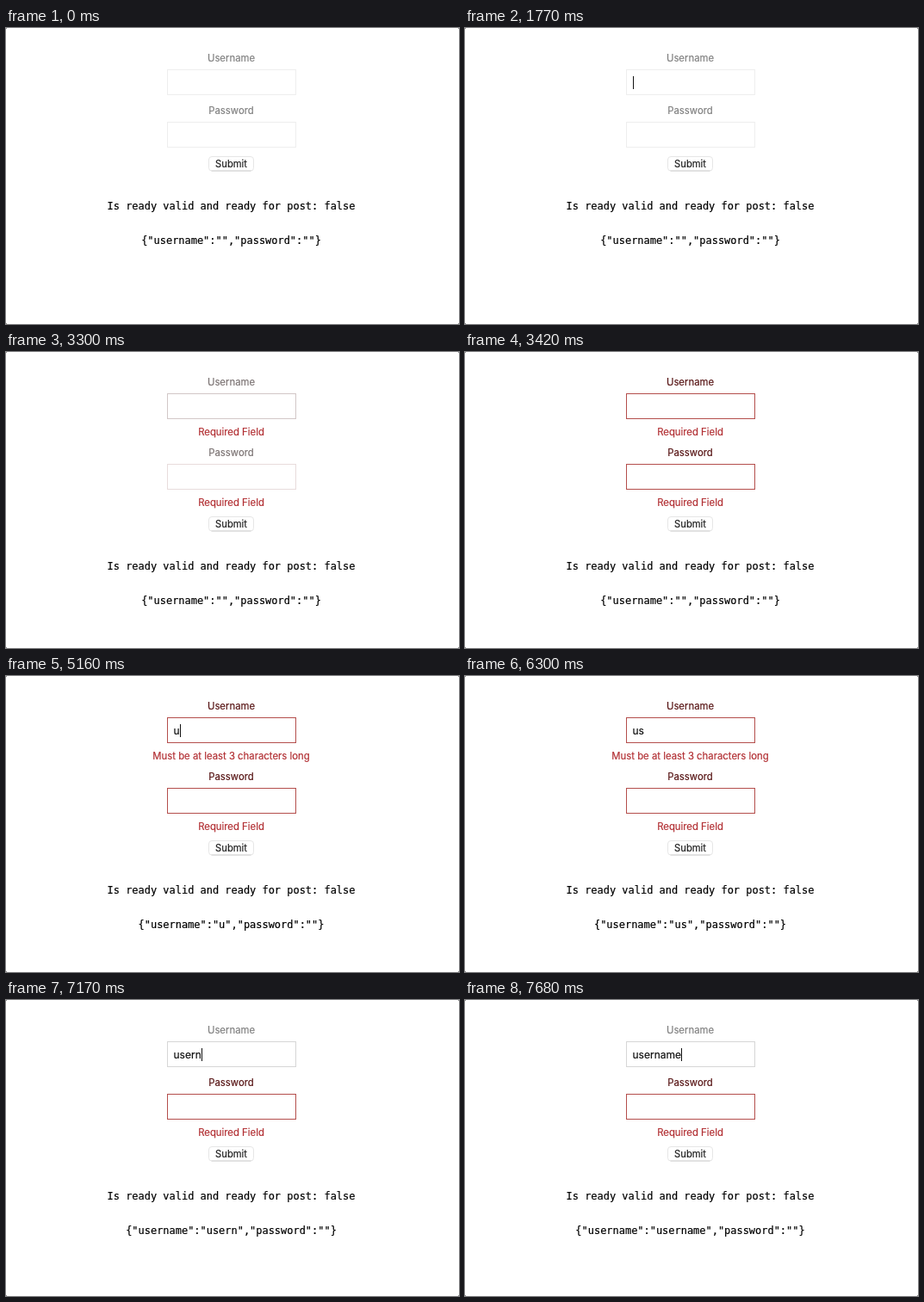
An HTML page with a canvas for the animation above (8 s loop, 526x344 px).

```html
<!DOCTYPE html>
<html lang="en">
<head>
<meta charset="utf-8">
<title>Form validation</title>
<style>
  html, body { margin: 0; width: 100%; height: 100%; overflow: hidden; background: #fff; }
  canvas { display: block; width: 526px; height: 344px; }
</style>
</head>
<body>
<canvas id="stage"></canvas>
<script>
const W = 526, H = 344, LOOP = 8000, MID = 261.5;
const SANS = 'Inter, sans-serif';
const LABEL = `11.35px ${SANS}`, INPUT = `12px ${SANS}`, BUTTON = `11.2px ${SANS}`;
const MONO = '11.96px "DejaVu Sans Mono", monospace';
const FOCUS = 1770, SUBMIT = 3270, VALID = 6330, FADE = 150;
const ERROR_ROW = 21;

const GREY_LABEL = [128, 128, 128], RED_LABEL = [88, 22, 22];
const IDLE = [238, 238, 238], ACTIVE = [214, 214, 214], RED_LINE = [180, 78, 76];
const RED_TEXT = 'rgb(178,48,52)';

// Moments at which the username gains one more letter.
const KEYS = [5160, 5790, 6330, 6840, 7170, 7350, 7500, 7680];
// Spans in which the caret is lit.
const CARET = [[1770, 2220], [2670, 3120], [4740, 5610], [5790, 6210], [6330, 6780], [6840, 8000]];

const canvas = document.getElementById('stage');
const ctx = canvas.getContext('2d');
const dpr = window.devicePixelRatio || 1;
canvas.width = Math.round(W * dpr);
canvas.height = Math.round(H * dpr);

const clamp = x => Math.max(0, Math.min(1, x));
const fade = (t, start) => {
  const x = clamp((t - start) / FADE);
  return x * x * (3 - 2 * x);
};
const mix = (a, b, k) => a.map((v, i) => v + (b[i] - v) * k);
const rgb = c => `rgb(${c.map(Math.round).join(',')})`;

// A hairline outline gives the letters a slightly fuller weight.
function text(str, x, y, font, color, align = 'center') {
  ctx.font = font;
  ctx.fillStyle = ctx.strokeStyle = color;
  ctx.textAlign = align;
  ctx.lineWidth = 0.2;
  ctx.fillText(str, x, y);
  ctx.strokeText(str, x, y);
}

function field(label, labelY, labelColor, lineColor, error) {
  const top = labelY + 9;
  text(label, MID, labelY, LABEL, rgb(labelColor));
  ctx.strokeStyle = rgb(lineColor);
  ctx.lineWidth = 1;
  ctx.strokeRect(187.5, top + 0.5, 149, 29);
  if (error) text(error, MID, top + 49, LABEL, RED_TEXT);
}

function button(y) {
  ctx.beginPath();
  ctx.roundRect(235.5, y + 0.5, 52, 16.5, 3.5);
  ctx.strokeStyle = '#e6e6e6';
  ctx.lineWidth = 1;
  ctx.stroke();
  ctx.fillStyle = '#d2d2d2';
  ctx.fillRect(238.5, y + 16.5, 46, 1);
  text('Submit', MID, y + 13, BUTTON, '#222');
}

function corners() {
  ctx.fillStyle = '#8c8c8c';
  for (const x of [0, W - 1]) for (const y of [0, H - 1]) ctx.fillRect(x, y, 1, 1);
}

function draw(t) {
  ctx.setTransform(dpr, 0, 0, dpr, 0, 0);
  ctx.fillStyle = '#fff';
  ctx.fillRect(0, 0, W, H);
  corners();

  const name = 'username'.slice(0, KEYS.filter(k => t >= k).length);
  const submitted = t >= SUBMIT;
  const nameBad = submitted && t < VALID;
  const red = fade(t, SUBMIT);
  const nameRed = red * (1 - fade(t, VALID));
  const nameLine = mix(mix(IDLE, ACTIVE, fade(t, FOCUS)), RED_LINE, nameRed);
  const nameError = nameBad && (name ? 'Must be at least 3 characters long' : 'Required Field');

  field('Username', 39, mix(GREY_LABEL, RED_LABEL, nameRed), nameLine, nameError);
  text(name, 194.5, 68, INPUT, '#111', 'left');
  if (CARET.some(([on, off]) => t >= on && t < off)) {
    const x = Math.round(194.5 + ctx.measureText(name).width);
    ctx.fillStyle = '#111';
    ctx.fillRect(x, 56, 1, 15);
  }

  let shift = nameBad ? ERROR_ROW : 0;
  field('Password', 100 + shift, mix(GREY_LABEL, RED_LABEL, red), mix(IDLE, RED_LINE, red),
    submitted && 'Required Field');

  if (submitted) shift += ERROR_ROW;
  button(149 + shift);
  text('Is ready valid and ready for post: false', MID, 211 + shift, MONO, '#000');
  text(JSON.stringify({ username: name, password: '' }), MID, 251 + shift, MONO, '#000');
}

function tick() {
  draw(performance.now() % LOOP);
  requestAnimationFrame(tick);
}
tick();
</script>
</body>
</html>
```
